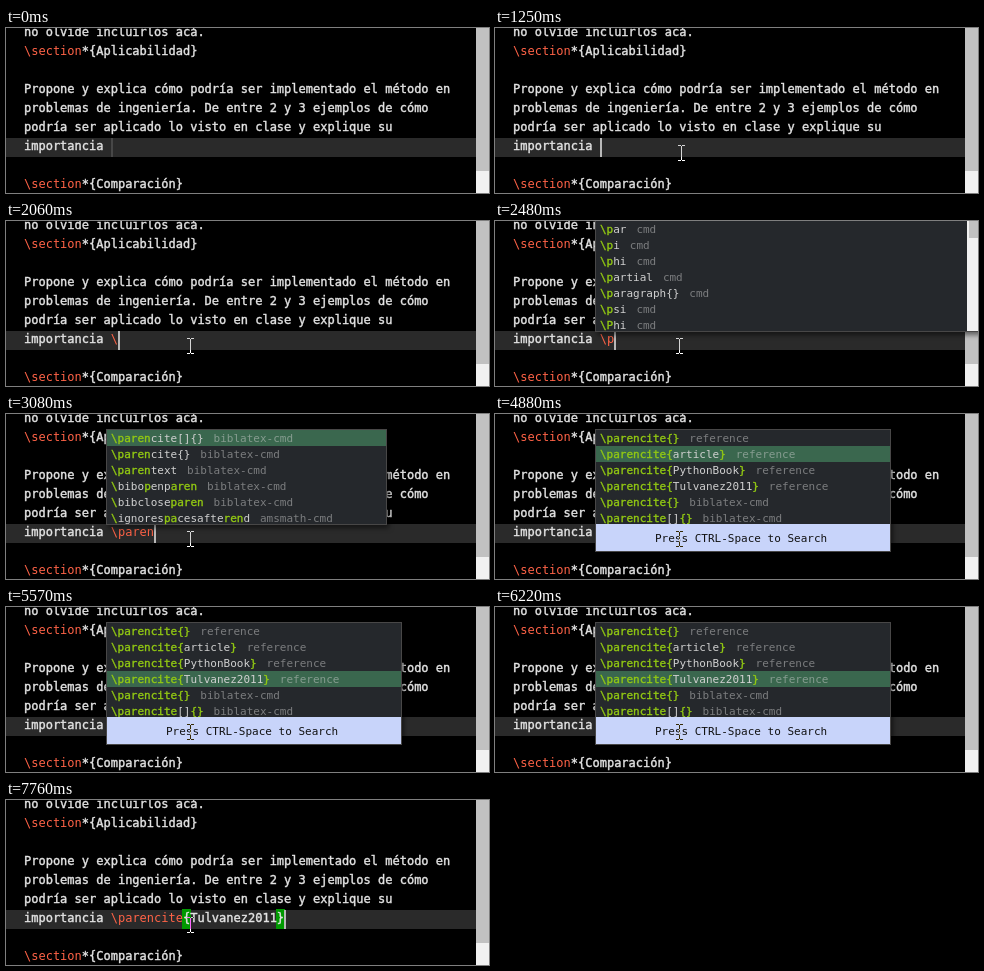
These frames come from a looping animation (483x165 px, 8000 ms). An HTML page:

```html
<!DOCTYPE html>
<html lang="es">
<head>
<meta charset="utf-8">
<style>
html, body { margin: 0; width: 100%; height: 100%; overflow: hidden; background: #000; }
svg { display: block; width: 483px; height: 165px; }
text { font: 12px "DejaVu Sans Mono", monospace; white-space: pre; fill: #e4e4e4; stroke: #e4e4e4; stroke-width: .4px; }
.cmd { fill: tomato; stroke: none; }
.popup text { font-size: 11px; fill: #d0d0d0; stroke: none; }
.popup .match { fill: #93ca12; stroke: #93ca12; stroke-width: .35px; }
.popup .meta { opacity: .5; }
.popup .hint { fill: #111; }
.shadow { filter: drop-shadow(2px 3px 2.5px rgba(0, 0, 0, .51)); }
.mouse { fill: none; stroke: #fff; mix-blend-mode: difference; }
</style>
</head>
<body>
<svg id="stage" viewBox="0 0 483 165"></svg>
<script>
const LOOP = 8000, LEFT = 18, CHAR = 7.224, SMALL = 6.622, ROW = 16;
const stage = document.getElementById('stage');
const KEY = 'Tulvanez2011';

const rect = (x, y, w, h, fill, extra = '') =>
  `<rect x="${x}" y="${y}" width="${w}" height="${h}" fill="${fill}" ${extra}/>`;
const text = (x, y, s, cls = '') => `<text x="${x}" y="${y}" class="${cls}">${s}</text>`;
const span = (s, cls) => `<tspan class="${cls}">${s}</tspan>`;
const code = s => s.replace(/\\[a-z]*/g, m => span(m, 'cmd'));
const col = n => Math.round(LEFT + n * CHAR);

// Last entry whose start time has been reached
const at = (list, t) => list.reduce((hit, e) => (t >= e[0] ? e : hit), list[0]);

const lines = [
  [8, 'no olvide incluirlos acá.'],
  [27, '\\section*{Aplicabilidad}'],
  [65, 'Propone y explica cómo podría ser implementado el método en'],
  [84, 'problemas de ingeniería. De entre 2 y 3 ejemplos de cómo'],
  [103, 'podría ser aplicado lo visto en clase y explique su'],
  [160, '\\section*{Comparación}']
];

const typed = [
  [0, ''], [2060, '\\'], [2480, '\\p'], [2790, '\\pa'], [2890, '\\par'], [3030, '\\pare'],
  [3080, '\\paren'], [3170, '\\parenc'], [3350, '\\parenci'], [3430, '\\parencit'],
  [3500, '\\parencite'], [4030, '\\parencite{}'], [7680, `\\parencite{${KEY}}`]
];

const withMeta = (meta, names) => names.split(' ').map(n => ['\\' + n, meta]);
const cites = withMeta('biblatex-cmd', 'parencite[]{} parencite{}');
const lists = {
  all: withMeta('cmd', 'item ref{} cite{} label{} textbf{} textit{} section{}'),
  p: withMeta('cmd', 'par pi phi partial paragraph{} psi Phi'),
  pa: withMeta('cmd', 'par partial paragraph{} pageref{} parallel parbox{}{} parindent'),
  paren: [...cites, ...withMeta('biblatex-cmd', 'parentext bibopenparen bibcloseparen'),
    ['\\ignorespacesafterend', 'amsmath-cmd']],
  cites,
  refs: [...withMeta('reference', `parencite{} parencite{article} parencite{PythonBook} parencite{${KEY}}`),
    cites[1], cites[0]]
};

// start, list, right edge
const popups = [
  [0], [2090, 'all', 500], [2480, 'p', 500], [2560, 'p', 468], [2790, 'pa', 468],
  [2890, 'pa', 458], [3030, 'paren', 381], [3170, 'cites', 381], [4030],
  [4070, 'refs', 396], [7680]
];
const picks = [[0, 0], [4880, 1], [5190, 2], [5570, 3], [5890, 2], [6220, 3]];

// Greedy in-order match, as the completer does it
function highlight(caption, needle) {
  let k = 0, run = '', on = false, out = '';
  const flush = () => { if (run) out += on ? span(run, 'match') : run; run = ''; };
  for (const c of caption) {
    const hit = k < needle.length && c.toLowerCase() === needle[k];
    if (hit) k++;
    if (hit !== on) { flush(); on = hit; }
    run += c;
  }
  flush();
  return out;
}

function popup(t, needle) {
  const [, name, right] = at(popups, t);
  if (!name) return '';
  const items = lists[name], refs = name === 'refs', long = items.length > 6;
  const first = 112 - items.length * ROW;
  const top = long ? -20 : first - 1, bottom = refs ? 138 : 111;
  let s = rect(100, top, right - 100, bottom - top, '#484747', 'class="shadow"');
  s += rect(101, top + 1, right - 102, bottom - top - 2, '#25282c');
  if (!long) s += rect(101, first + at(picks, t)[1] * ROW, right - 102, ROW, '#3a674e');
  items.forEach(([caption, meta], i) => {
    const y = first + i * ROW + 12;
    s += text(105, y, highlight(caption, needle));
    s += text(105 + caption.length * SMALL + 9.9, y, meta, 'meta');
  });
  if (refs) {
    s += rect(101, 110, right - 102, 27, '#c8d4fa');
    s += text(160, 128, 'Press CTRL-Space to Search', 'hint');
  }
  if (right > 483) {
    s += rect(472, 0, 11, 110, '#f1f1f1');
    s += rect(474, 0, 9, name === 'p' ? 17 : 8, '#c1c1c1');
  }
  return `<g class="popup">${s}</g>`;
}

function caret(t, n) {
  const dim = .2;
  let level = 1;
  if (t < 1040 || (t >= 1730 && t < 2060)) level = dim;
  else if (t < 1250) level = dim + (1 - dim) * Math.floor((t - 1040) / 70) / 3;
  return rect(col(n), 110, 2, 19, '#b8b8b8', `opacity="${level.toFixed(2)}"`);
}

function mouse(t) {
  if (t < 320) return '';
  let x, y;
  if (t < 840) {
    const u = Math.min(5, Math.floor((t - 320) / 50)) / 5, e = u * (2 - u);
    x = 249.5 - 55 * e;
    y = 162 - 30 * e;
  } else {
    [, x, y] = at([[840, 192.5, 130], [890, 190.5, 128], [1040, 189.5, 127], [1110, 188.5, 126],
      [1180, 187.5, 125], [1250, 186.5, 125], [1400, 185.5, 125], [1450, 184.5, 125]], t);
  }
  return `<path class="mouse" transform="translate(${x} ${y})"
    d="M-3.5-7.5H-.5M.5-7.5H3.5M0-7V7M-3.5 7.5H-.5M.5 7.5H3.5"/>`;
}

function scene(t) {
  const entry = at(typed, t)[1], n = 12 + entry.length;
  let s = rect(0, 0, 483, 165, '#000') + rect(0, 110, 470, 19, '#2a2a2a');
  if (t >= 7760) for (const c of [22, n - 1]) s += rect(col(c) - 1, 109, 9, 20, '#090');
  for (const [y, line] of lines) s += text(LEFT, y, code(line));
  s += text(LEFT, 122, 'importancia ' + code(entry));
  s += caret(t, t >= 4030 && t < 7680 ? n - 1 : n);
  s += rect(470, 0, 13, 165, '#f1f1f1') + rect(470, 0, 13, 143, '#c1c1c1');
  return s + popup(t, entry) + mouse(t);
}

let shown = '';
const begin = performance.now();
function draw() {
  const next = scene((performance.now() - begin) % LOOP);
  if (next !== shown) stage.innerHTML = shown = next;
  requestAnimationFrame(draw);
}
draw();
</script>
</body>
</html>
```
